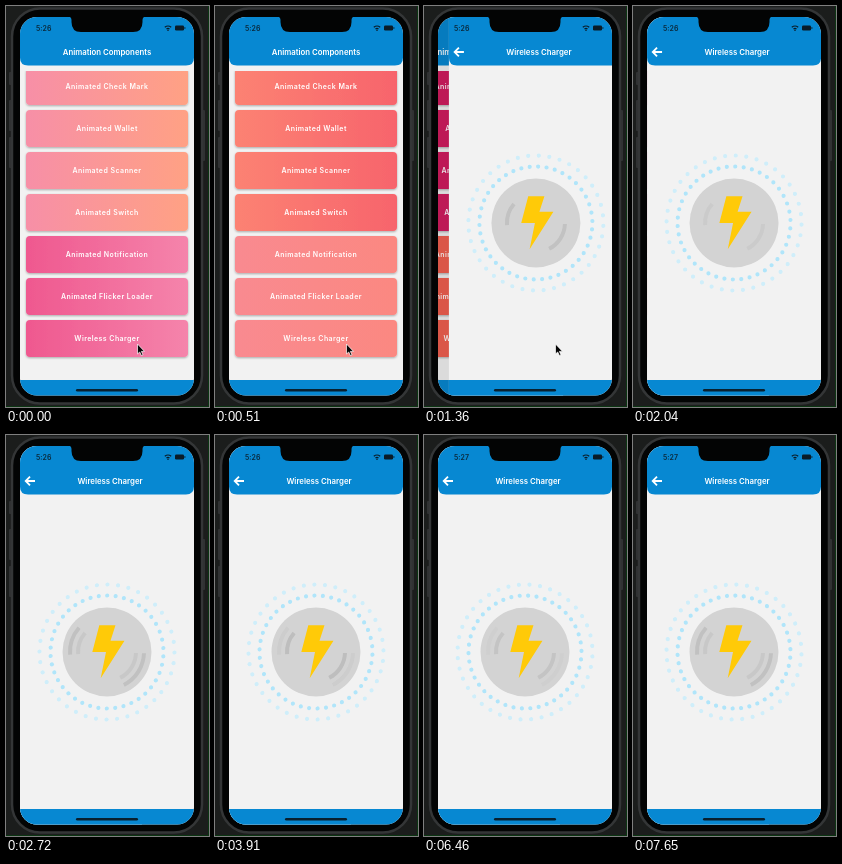
An HTML page that plays this animation: 203 px wide and 401 px high, repeating every 7820 ms.

```html
<!DOCTYPE html>
<html lang="en">
<head>
<meta charset="utf-8">
<title>Animation Components</title>
<style>
  html, body { margin: 0; width: 100%; height: 100%; overflow: hidden; background: #1b1d1c; }
  svg { display: block; width: 100%; height: 100%; }
  text { font-family: Inter, Roboto, sans-serif; font-weight: 600; fill: #fff; }
  .title { font-size: 7.8px; text-anchor: middle; }
  .label { font-size: 7px; letter-spacing: .42px; text-anchor: middle; }
  #clock { font-size: 7px; fill: #0a2a3d; }
  #phone { filter: blur(.4px); }
</style>
</head>
<body>
<svg viewBox="0 0 203 401">
  <defs>
    <clipPath id="screen"><rect x="14" y="11" width="174" height="378.500" rx="17"/></clipPath>
    <clipPath id="list"><rect x="14" y="65" width="174" height="309"/></clipPath>
    <linearGradient id="warm"><stop/><stop offset="1"/></linearGradient>
    <linearGradient id="cool"><stop/><stop offset="1"/></linearGradient>
    <filter id="soft" x="-10%" y="-20%" width="120%" height="150%">
      <feDropShadow dx="0" dy="1" stdDeviation="1" flood-opacity=".3"/>
    </filter>
    <g id="chrome">
      <rect x="14" y="11" width="174" height="379" fill="#f2f2f2"/>
      <path d="M14 11H188V51.500Q188 59.500 180 59.500H22Q14 59.500 14 51.500Z" fill="#0788d2"/>
      <rect x="14" y="374" width="174" height="16" fill="#0788d2"/>
    </g>
  </defs>

  <path d="M202.500 0V400.500H0" fill="none" stroke="#0b3512"/>
  <g id="phone">
    <g fill="#303233">
      <rect x="3" y="66" width="4" height="13" rx="1"/>
      <rect x="3" y="94" width="4" height="31" rx="1"/>
      <rect x="3" y="131" width="4" height="31" rx="1"/>
      <rect x="195" y="104" width="4" height="51" rx="1"/>
    </g>
    <rect x="6" y="2.500" width="190" height="395" rx="28" fill="#030404" stroke="#343637" stroke-width="2.500"/>

    <g clip-path="url(#screen)">
      <g id="menu">
        <use href="#chrome"/>
        <text class="title" x="101" y="48.800">Animation Components</text>
        <g id="buttons" clip-path="url(#list)"></g>
      </g>
      <rect id="shade" x="14" y="11" width="174" height="379"/>
      <g id="detail">
        <use href="#chrome"/>
        <path d="M29 46H20M24 41.700L19.700 46L24 50.300" fill="none" stroke="#fff" stroke-width="1.800"/>
        <text class="title" x="104" y="48.800">Wireless Charger</text>
        <g id="dots"></g>
        <circle cx="101" cy="217" r="44.500" fill="#d3d3d3"/>
        <g id="arcs" fill="none" stroke="#bdbdbd" stroke-width="4"></g>
        <path d="M93.300 190.300H109.500L104.500 205.800H118.500L94.700 243.300L100 217H86.300Z" fill="#ffca08"/>
      </g>
      <text id="clock" x="30" y="24.800"></text>
      <path d="M158.800 21.300Q162 18.700 165.200 21.300M160.500 23Q162 21.800 163.500 23" fill="none" stroke="#0a1c28" stroke-width="1.200"/>
      <circle cx="162" cy="24.300" r=".8" fill="#0a1c28"/>
      <rect x="169" y="19.500" width="9" height="5" rx="1.300" fill="#0a1c28"/>
      <rect x="178.500" y="21" width=".8" height="2" fill="#0a1c28"/>
      <rect x="70" y="383" width="62" height="2.400" rx="1.200" fill="#08202f"/>
    </g>
    <path d="M62 10H140Q136.500 11 136.500 14V16Q136.500 26 127 26H75Q65.500 26 65.500 16V14Q65.500 11 62 10Z" fill="#030404"/>

    <circle id="tap" cx="131" cy="338.500" r="14.500" fill="#777" fill-opacity=".22" stroke="#24282b" stroke-width="1"/>
    <path id="cursor" d="M131.500 338V348L133.700 346L135.400 349.600L137 348.900L135.400 345.400H138.500Z" fill="#050505" stroke="#fff" stroke-width=".7"/>
  </g>
</svg>

<script>
const LOOP = 7820, STEP = 170, PULSE = 1000, WIDTH = 174;
const CENTER = { x: 101, y: 217 };
const $ = id => document.getElementById(id);

function add(parent, tag, attrs, text = '') {
  const el = document.createElementNS('http://www.w3.org/2000/svg', tag);
  for (const key in attrs) el.setAttribute(key, attrs[key]);
  el.textContent = text;
  return parent.appendChild(el);
}

const polar = (radius, degrees) => {
  const a = degrees * Math.PI / 180;
  return [CENTER.x + radius * Math.cos(a), CENTER.y + radius * Math.sin(a)];
};

const items = ['Check Mark', 'Wallet', 'Scanner', 'Switch', 'Notification', 'Flicker Loader']
  .map(name => 'Animated ' + name).concat('Wireless Charger');
items.forEach((name, i) => {
  const y = 62 + 42 * i;
  add($('buttons'), 'rect', {
    x: 20, y, width: 162, height: 37, rx: 4,
    fill: `url(#${i < 4 ? 'warm' : 'cool'})`, filter: 'url(#soft)'
  });
  add($('buttons'), 'text', { class: 'label', x: 101, y: y + 20.7 }, name);
});

function addRing(radius, count, shift, fill) {
  for (let i = 0; i < count; i++) {
    const [cx, cy] = polar(radius, (i + shift) * 360 / count);
    add($('dots'), 'circle', { cx, cy, r: 2.1, fill });
  }
}
addRing(56.5, 42, 0, '#b0e5fa');
addRing(67.5, 40, .5, '#cfeefa');

function addWave(radius) {
  const d = [[176, 221], [2, 63]].map(([from, to]) =>
    `M${polar(radius, from)}A${radius} ${radius} 0 0 1 ${polar(radius, to)}`).join('');
  return add($('arcs'), 'path', { d });
}
const inner = addWave(29), outer = addWave(37);

// Each key is [time, value]; values are numbers or arrays of numbers.
function tween(keys, t) {
  const next = keys.findIndex(key => key[0] > t);
  if (next < 0) return keys[keys.length - 1][1];
  if (next === 0) return keys[0][1];
  const [t0, a] = keys[next - 1], [t1, b] = keys[next];
  const k = (t - t0) / (t1 - t0);
  return Array.isArray(a) ? a.map((v, i) => v + (b[i] - v) * k) : a + (b - a) * k;
}

const rgb = hex => [0, 2, 4].map(i => parseInt(hex.slice(i, i + 2), 16));
const shades = (...hexes) => hexes.map((hex, i) => [[0, 850, 1360][i], rgb(hex)]);
const gradients = {
  warm: [shades('f78fa7', 'ff7a50', 'd81b60'), shades('ffa184', 'f23b5c', 'c2185b')],
  cool: [shades('ef588f', 'ffab91', 'f26450'), shades('f584ab', 'ff8a65', 'ef5350')]
};
const innerFade = [[0, .5], [.2, 0], [.28, 0], [.36, .75], [.65, .5], [.75, .5], [.9, 1], [1, .5]];
const outerFade = [[.42, 0], [.6, .8], [.75, .8], [.91, .3], [1, 0]];

function render(t) {
  for (const id in gradients) {
    [...$(id).children].forEach((stop, i) =>
      stop.setAttribute('stop-color', `rgb(${tween(gradients[id][i], t).map(Math.round)})`));
  }

  const offset = t < 1000 ? WIDTH : WIDTH * Math.exp((1000 - t) / 130);
  $('menu').setAttribute('transform', `translate(${-.3 * (WIDTH - offset)} 0)`);
  $('detail').setAttribute('transform', `translate(${offset} 0)`);
  $('shade').setAttribute('opacity', .1 * (1 - offset / WIDTH));
  $('dots').setAttribute('transform', `rotate(${-1.5 * t / 1000} ${CENTER.x} ${CENTER.y})`);

  const phase = t % PULSE / PULSE;
  inner.setAttribute('opacity', tween(innerFade, phase));
  outer.setAttribute('opacity', tween(outerFade, phase));

  $('clock').textContent = t < 4930 ? '5:26' : '5:27';
  $('tap').setAttribute('visibility', t >= 680 && t < 1020 ? 'visible' : 'hidden');
  $('cursor').setAttribute('visibility', t < 2040 ? 'visible' : 'hidden');
}

const start = performance.now();
function tick() {
  const t = (performance.now() - start) % LOOP;
  render(Math.floor(t / STEP) * STEP);
  requestAnimationFrame(tick);
}
tick();
</script>
</body>
</html>
```
